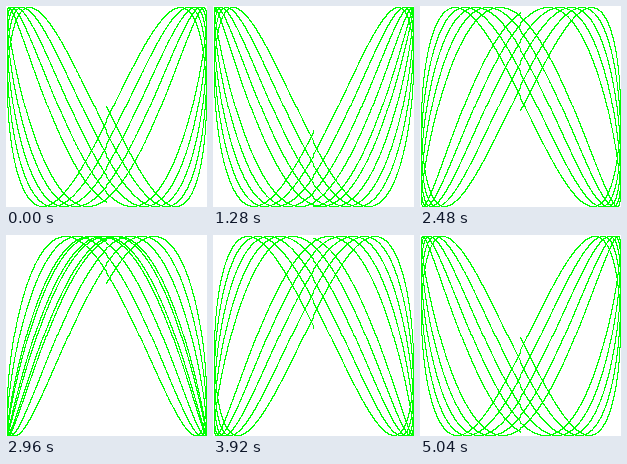
These frames come from a looping animation (201x201 px, 5.12 s). An HTML page with a canvas:

```html
<!DOCTYPE html>
<html lang="en">
<head>
<meta charset="utf-8">
<title>Lissajous</title>
<style>
  html, body { margin: 0; width: 100%; height: 100%; overflow: hidden; background: #fff; }
  canvas { display: block; }
</style>
</head>
<body>
<canvas id="stage" width="201" height="201"></canvas>
<script>
const SIZE = 100, SIDE = 2 * SIZE + 1;
const CYCLES = 5, STEP = 0.001;
const FREQ = 2 + 0.13 / Math.PI; // relative frequency of the vertical oscillator
const STEPS = 64, DELAY = 80, PHASE_STEP = 0.1;
const WHITE = 0xffffffff, GREEN = 0xff00ff00;

const ctx = document.getElementById('stage').getContext('2d');
const image = ctx.createImageData(SIDE, SIDE);
const pixels = new Uint32Array(image.data.buffer);

// Truncates toward zero, so the curve covers pixels 1 to 200.
const toPixel = v => SIZE + Math.trunc(v * SIZE + 0.5);

function draw(phase) {
  pixels.fill(WHITE);
  for (let t = 0; t < CYCLES * 2 * Math.PI; t += STEP) {
    const x = toPixel(Math.sin(t));
    const y = toPixel(Math.sin(t * FREQ + phase));
    pixels[y * SIDE + x] = GREEN;
  }
  ctx.putImageData(image, 0, 0);
}

const start = performance.now();
let shown = -1;

function tick() {
  const elapsed = Math.max(0, performance.now() - start);
  const step = Math.floor(elapsed / DELAY) % STEPS;
  if (step !== shown) {
    shown = step;
    draw(step * PHASE_STEP);
  }
  requestAnimationFrame(tick);
}
tick();
</script>
</body>
</html>
```
